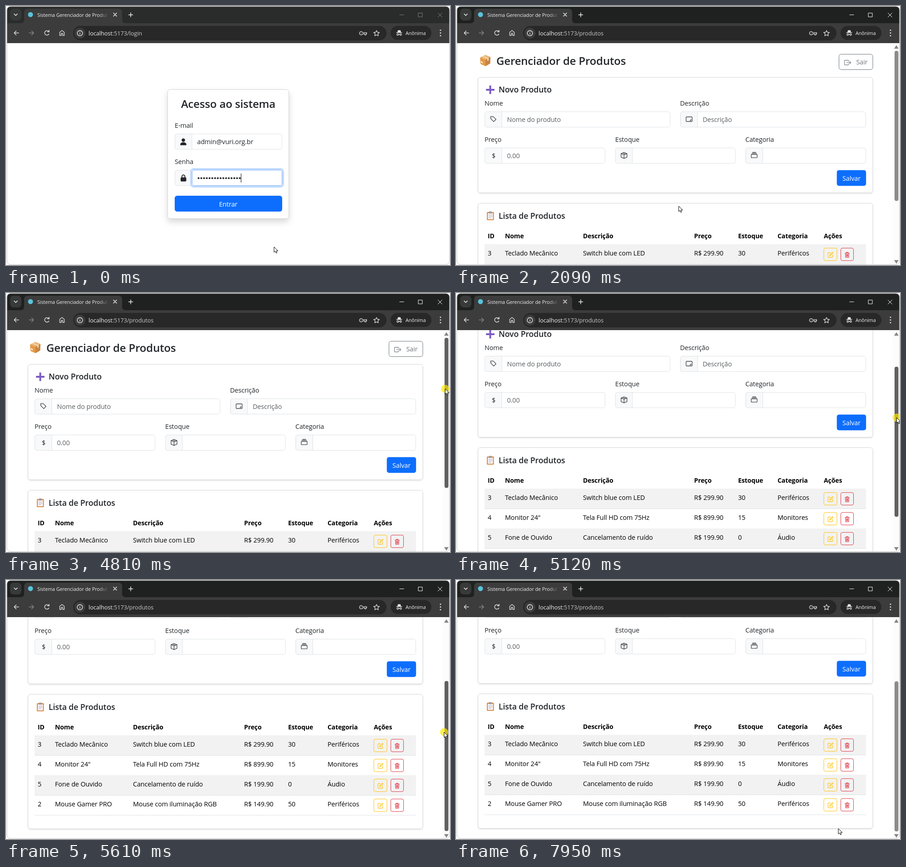
An HTML page that plays this animation: 979x572 px, repeating every 8 s.

```html
<!DOCTYPE html>
<html lang="pt-BR">
<head>
<meta charset="utf-8">
<title>Sistema Gerenciador de Produtos</title>
<style>
html, body { margin: 0; width: 100%; height: 100%; overflow: hidden; background: #fff; }
svg { display: block; }
text { font-family: "Open Sans", "Noto Sans", sans-serif; letter-spacing: -.1px; white-space: pre; }
.icon { fill: none; stroke: currentColor; stroke-linecap: round; stroke-linejoin: round; }
</style>
</head>
<body>
<svg id="stage" width="979" height="572" viewBox="0 0 979 572"></svg>
<script>
const LOOP = 8000, INK = '#212529', LINE = '#dee2e6', BLUE = '#0d6efd', HINT = '#595c5f';
const BODY = 14.35, HEAD = 23.9, SUBHEAD = 17.7;

const ICONS = {
  tag: 'M1.5 2.5a1 1 0 0 1 1-1h4.6l7 7-5.3 5.3-7-7zM4.6 4.6h.2',
  note: 'M2 2.5h12a1.2 1.2 0 0 1 1.2 1.2v8.6a1.2 1.2 0 0 1-1.2 1.2H2a1.2 1.2 0 0 1-1.2-1.2V3.7A1.2 1.2 0 0 1 2 2.5zM12.5 8.3v2.5h-2.5',
  box: 'M8 .8 15 3.6v8.8L8 15.2 1 12.4V3.6zM1 3.6l7 2.8 7-2.8M8 6.4v8.8M4.5 2.2l7 2.8',
  stack: 'M2 6.5h12a1 1 0 0 1 1 1v6a1 1 0 0 1-1 1H2a1 1 0 0 1-1-1v-6a1 1 0 0 1 1-1zM2.5 4.2h11M4 2h8',
  exit: 'M10 5V3.5a1 1 0 0 0-1-1H1.5a1 1 0 0 0-1 1v9a1 1 0 0 0 1 1H9a1 1 0 0 0 1-1V11M5.5 8H15.5M12.5 5l3 3-3 3',
  edit: 'M14 8v5.5a1 1 0 0 1-1 1H2.5a1 1 0 0 1-1-1V3a1 1 0 0 1 1-1H8M6 10.3l.5-2.5 7-7 1.9 1.9-7 7z',
  trash: 'M2 3.5h12M3.2 3.5l.8 11.5h8l.8-11.5M5.5 3.3V1.5h5v1.8M6 6v6.5M8 6v6.5M10 6v6.5'
};

const text = (x, y, s, size = BODY, fill = INK, more = '') =>
  `<text x="${x}" y="${y}" font-size="${size}" fill="${fill}" ${more}>${s}</text>`;
const title = (x, y, s, size, more = '') => text(x, y, s, size, INK, 'font-weight="600" ' + more);
const box = (x, y, w, h, r, fill, more = '') =>
  `<rect x="${x}" y="${y}" width="${w}" height="${h}" rx="${r}" fill="${fill}" ${more}/>`;
const outline = (x, y, w, h, r, color, fill = 'none') =>
  box(x + .5, y + .5, w - 1, h - 1, r, fill, `stroke="${color}"`);
const stroke = (d, color, width = 1.4, more = '') =>
  `<path class="icon" d="${d}" style="color:${color}" stroke-width="${width}" ${more}/>`;
const icon = (name, cx, cy, color = INK, scale = .93) =>
  stroke(ICONS[name], color, 1.1 / scale, `transform="translate(${cx - 8 * scale} ${cy - 8 * scale}) scale(${scale})"`);
const card = (x, y, w, h, filter) =>
  box(x + .5, y + .5, w - 1, h - 1, 5.5, '#fff', `stroke="#d3d5d7" filter="url(#${filter})"`);
const middle = 'text-anchor="middle"';

function field(x, y, w, glyph, value = '', color = HINT) {
  return outline(x, y, w, 35, 5, LINE, '#fff') +
    `<path d="M${x + 38} ${y + .5}h-32.5a5 5 0 0 0-5 5v24a5 5 0 0 0 5 5h32.5z" fill="#f8f9fa" stroke="${LINE}"/>` +
    glyph + text(x + 49.5, y + 23, value, BODY, color);
}

function rowButton(name, x, y, w, color) {
  return outline(x, y, w, 28.6, 3.5, color) + icon(name, x + w / 2, y + 15.3, color, .82);
}

function browser() {
  const light = '#dcdcdc';
  return box(2, 1, 976, 38, 0, '#1f2020', 'id="strip"') + box(2, 38, 976, 44, 0, '#3c3c3c') +
    '<path d="M32 38q8 0 8-8V14q0-8 8-8h200q8 0 8 8v16q0 8 8 8z" fill="#3c3c3c"/>' +
    box(9, 6, 25, 26, 8, '#383939') + stroke('M18 17.5l3.5 3.5 3.5-3.5', '#eee', 1.6) +
    '<circle cx="54" cy="19" r="5.5" fill="#58c4dc"/>' +
    text(69, 23.5, 'Sistema Gerenciador de Produt', 10.8, 'url(#fade)') +
    stroke('M237 15.5l7 7m0-7l-7 7M270.5 19.5h9m-4.5-4.5v9', '#eee', 1.5) +
    '<g id="controls">' + stroke('M868 19.5h9M909.5 15.5h8.5v8.5h-8.5zM952.5 15.5l9 9m0-9l-9 9', 'inherit', 1) + '</g>' +
    stroke('M28 59.5H18m4.5-4.5L18 59.5l4.5 4.5', light, 1.5) +
    stroke('M51 59.5h10m-4.5-4.5l4.5 4.5-4.5 4.5', '#858585', 1.5) +
    stroke('M94.5 62a5 5 0 1 1-.8-6.2l1.3 1.3m0-3.6v3.6h-3.6', light, 1.5) +
    stroke('M118.5 65v-7l5-4 5 4v7h-3.5v-4.5h-3V65z', light, 1.4) +
    box(148, 44, 691, 32, 16, '#282828') + '<circle cx="163" cy="60" r="12" fill="#3c3c3c"/>' +
    stroke('M163 54.2a5.8 5.8 0 1 0 .01 0M163 59.7v3M163 57.2v.1', light, 1.4) +
    `<text x="182" y="65" font-size="12.8" fill="#f0f0f0">localhost<tspan fill="#c8c8c8" id="path"></tspan></text>` +
    stroke('M786.5 58.8a3.7 3.7 0 1 0 0 2.7h4.5v2.3h2.8v-2.3h1.5v-2.7zM782.9 60.1h.2', light, 1.3) +
    stroke('M817 54l1.9 4 4.4.5-3.3 3 .9 4.4-3.9-2.2-3.9 2.2.9-4.4-3.3-3 4.4-.5z', light, 1.3) +
    box(848, 44, 90, 31, 15.5, '#282828') +
    '<path d="M863 58l1.3-4.5h5.4L871 58z" fill="#e8e8e8"/>' +
    stroke('M861 58.7h12M865.5 63a1.8 1.8 0 1 1-3.6 0 1.8 1.8 0 1 1 3.6 0zm6.6 0a1.8 1.8 0 1 1-3.6 0 1.8 1.8 0 1 1 3.6 0zm-6.6-.4h3', '#e8e8e8', 1.2) +
    text(881, 63.5, 'Anônima', 10.8, '#f0f0f0') +
    [53.5, 59.5, 65.5].map(y => `<circle cx="958" cy="${y}" r="1.5" fill="${light}"/>`).join('');
}

function login() {
  const person = `<circle cx="391" cy="296.3" r="3.7" fill="${INK}"/>
    <path d="M384.2 306.500q0-5.500 6.800-5.500t6.800 5.500q0 1-1 1h-11.600q-1 0-1-1z" fill="${INK}"/>`;
  const lock = box(385, 378.5, 12.5, 9, 2, INK) + stroke('M387.9 379v-2.5a3.3 3.3 0 0 1 6.6 0v2.5', INK, 1.8);
  const dots = Array.from({ length: 16 }, (_, i) =>
    `<circle cx="${424.6 + i * 6.06}" cy="380.3" r="2.05" fill="${INK}"/>`).join('');
  return card(356, 184, 268, 286, 'deep') +
    title(490, 225, 'Acesso ao sistema', HEAD, middle) +
    text(372, 269, 'E-mail') + field(372, 282, 237, person, 'admin@vuri.org.br', INK) +
    text(372, 349, 'Senha') + field(372, 362, 237, lock) +
    `<g id="focus">${box(408, 360, 203, 39, 6, '#fff', 'stroke="#c2dbfe" stroke-width="4"')}
      ${outline(410, 362, 199, 35, 4.5, '#86b7fe')}</g>` +
    dots + box(517.8, 370, 1, 20, 0, '#000', 'id="caret"') +
    box(370.2, 417.2, 240.6, 38.6, 7, 'none', 'id="ring" stroke="#b9d0f7" stroke-width="3.7"') +
    box(372, 419, 237, 35, 5.5, BLUE) + box(372, 419, 237, 35, 5.5, '#0b5ed7', 'id="hover"') +
    text(490, 443, 'Entrar', BODY, '#fff', middle);
}

function products() {
  const parcel = `<path d="M53 113.500l12-5.500 11 4.500-11 6z" fill="#e8b475"/>
    <path d="M53 113.500l12 5v14.500l-11-5z" fill="#e59a45"/>
    <path d="M65 118.500l11-6-.5 14.500L65 133z" fill="#c98543"/>
    <path d="M57.500 111.500l3-1.400 11.500 4.800v5l-3 1.500v-4.900z" fill="#f3d6a5"/>
    <path d="M55 121.500l4 1.700v3.800l-4-1.700z" fill="#f4e5ce"/>`;
  const clipboard = box(68, 455, 15.5, 18, 1.5, '#d98b48') + box(70, 457.5, 11.5, 13.5, 0, '#f7f3f5') +
    box(72.5, 453.8, 6.5, 4.5, 1, '#9b9ba3') +
    stroke('M72 461.5h7.5m-7.5 3h7.5m-7.5 3h5', '#a9aac0', .9);
  const columns = [70, 108, 280, 525, 622, 709, 811];
  const heads = ['ID', 'Nome', 'Descrição', 'Preço', 'Estoque', 'Categoria', 'Ações'];
  const rows = [
    ['3', 'Teclado Mecânico', 'Switch blue com LED', 'R$ 299.90', '30', 'Periféricos'],
    ['4', 'Monitor 24"', 'Tela Full HD com 75Hz', 'R$ 899.90', '15', 'Monitores'],
    ['5', 'Fone de Ouvido', 'Cancelamento de ruído', 'R$ 199.90', '0', 'Áudio'],
    ['2', 'Mouse Gamer PRO', 'Mouse com iluminação RGB', 'R$ 149.90', '50', 'Periféricos']
  ];
  const table = rows.map((cells, i) => {
    const y = 526 + 44 * i;
    return (i % 2 ? '' : box(63, y, 841, 44, 0, '#f2f2f2')) + box(63, y + 44, 841, 1, 0, LINE) +
      cells.map((s, c) => text(columns[c], y + 25, s, BODY, '#000')).join('') +
      rowButton('edit', 810.5, y + 8.2, 30, '#ffc107') +
      rowButton('trash', 848, y + 8.2, 29, '#dc3545');
  }).join('');
  return parcel + title(89, 129.5, 'Gerenciador de Produtos', HEAD) +
    outline(844, 106, 75.5, 35, 5, '#6c757d') + icon('exit', 863.5, 125, '#6c757d') +
    text(882.5, 129, 'Sair', BODY, '#6c757d') +
    card(48, 157, 871.5, 256, 'soft') +
    box(66, 183, 19, 4, 1, '#7a5bc4') + box(73.5, 175.5, 4, 19, 1, '#7a5bc4') +
    title(94, 191, 'Novo Produto', SUBHEAD) +
    text(63, 220, 'Nome') + field(63, 233, 409.5, icon('tag', 82.5, 250), 'Nome do produto') +
    text(494, 220, 'Descrição') + field(494.5, 233, 409.5, icon('note', 514, 250), 'Descrição') +
    text(63, 300, 'Preço') + field(63, 313, 266, text(83, 335.5, '$', BODY, INK, middle), '0.00') +
    text(351, 300, 'Estoque') + field(351, 313, 265.5, icon('box', 370.5, 330)) +
    text(638, 300, 'Categoria') + field(638.5, 313, 265.5, icon('stack', 657.5, 329)) +
    box(839.7, 362.4, 64.5, 34.8, 5, BLUE) + text(872, 386, 'Salvar', BODY, '#fff', middle) +
    card(48, 435, 871.5, 298, 'soft') + clipboard + title(94, 469.5, 'Lista de Produtos', SUBHEAD) +
    heads.map((s, c) => text(columns[c], 513, s, 14, '#000', 'font-weight="700"')).join('') +
    box(63, 526, 841, 1, 0, LINE) + table;
}

const stage = document.getElementById('stage');
stage.innerHTML = `<defs>
  <clipPath id="window"><rect x="2" y="1" width="976" height="570" rx="8"/></clipPath>
  <clipPath id="view"><rect x="2" y="82" width="976" height="489"/></clipPath>
  <linearGradient id="fade" gradientUnits="userSpaceOnUse" x1="204" x2="226" y1="0" y2="0">
    <stop stop-color="#eee"/><stop offset="1" stop-color="#eee" stop-opacity="0"/></linearGradient>
  <filter id="deep" x="-20%" y="-20%" width="140%" height="140%"><feDropShadow dx="0" dy="7" stdDeviation="7" flood-opacity=".15"/></filter>
  <filter id="soft" x="-5%" y="-5%" width="110%" height="110%"><feDropShadow dx="0" dy="2" stdDeviation="1.8" flood-opacity=".09"/></filter>
  </defs>
  <g clip-path="url(#window)">
    ${browser()}
    <g clip-path="url(#view)">
      <g id="login">${login()}</g>
      <g id="products"><g id="scroll">${products()}</g>
        ${box(963, 82, 15, 489, 0, '#fcfcfc')}
        <path d="M966 94.300l5-7.800 5 7.800zM966 561.200l5 7.800 5-7.800z" fill="#858585"/>
        ${box(967, 99, 8.5, 331.5, 4, '#8b8b8b', 'id="thumb"')}</g>
    </g>
  </g>
  ${box(2, 1, 976, 570, 8, 'none', 'stroke="#c4c4c4"')}
  <g id="cursor">
    <circle id="press" r="9" fill="#ffe900" opacity=".68"/>
    <path id="arrow" d="M0 0V12L2.800 9.500 4.700 13.800 6.700 12.900 4.900 8.800H8.800Z" fill="#fff" stroke="#000"/>
    <path id="hand" d="M-3.500 8V1a1.300 1.300 0 0 1 2.600 0V5q2.200-.8 2.400.6 2-.5 2.200.7 1.800-.3 1.800 1.300V11q0 1.800-1.300 3.200V15.500h-5.600v-1.200L-6.600 9.500q-.5-1.500 1-1.600z" fill="#fff" stroke="#000"/>
  </g>`;

const el = {};
stage.querySelectorAll('[id]').forEach(node => el[node.id] = node);

// Pointer path: time, x, y
const POINTER = [
  [60, 591, 532], [250, 572, 515], [520, 506, 460], [760, 491, 447], [900, 491, 447], [1140, 491, 442],
  [2970, 491, 442], [3090, 540, 425], [3400, 810, 331], [3590, 895, 299], [3710, 938, 275],
  [3780, 938, 275], [4000, 953, 245], [4410, 968.3, 211.5], [4810, 968.3, 211.5], [4900, 969, 224],
  [5120, 971.5, 275], [5400, 968, 328], [5490, 966, 336], [5610, 966, 336], [6050, 965, 347],
  [7180, 965, 347], [7330, 950, 375], [7700, 860, 526], [7950, 843, 549]
];
const clamp = (v, lo, hi) => Math.min(hi, Math.max(lo, v));
const show = (node, on) => node.setAttribute('visibility', on ? 'visible' : 'hidden');

function pointerAt(t) {
  const i = POINTER.findIndex(key => key[0] > t);
  if (i === 0) return POINTER[0].slice(1);
  if (i < 0) return POINTER[POINTER.length - 1].slice(1);
  const [a, b] = [POINTER[i - 1], POINTER[i]], k = (t - a[0]) / (b[0] - a[0]);
  return [1, 2].map(n => a[n] + (b[n] - a[n]) * k);
}

function draw(t) {
  const [x, y] = pointerAt(t);
  const loggedIn = t >= 1900, active = t >= 1700;
  const clicking = t >= 1700 && t < 1850, dragging = t >= 4740 && t < 6670;
  const overButton = !loggedIn && y < 454;
  const scroll = t < 4740 ? 0 : t > 6050 ? 184 : Math.round(clamp((y - 211.5) * 1.47, 0, 184));

  el.login.style.display = loggedIn ? 'none' : '';
  el.products.style.display = loggedIn ? '' : 'none';
  el.path.textContent = loggedIn ? ':5173/produtos' : ':5173/login';
  el.strip.setAttribute('fill', active ? '#1f2020' : '#2a2b2b');
  el.controls.style.color = active ? '#fff' : '#828282';

  el.focus.setAttribute('opacity', clamp(1 - (t - 60) / 150, 0, 1));
  el.caret.setAttribute('opacity', t < 60 ? 1 : 0);
  el.hover.setAttribute('opacity', clamp((t - 600) / 150, 0, 1));
  el.ring.setAttribute('opacity', clamp((t - 1700) / 150, 0, 1));

  el.scroll.setAttribute('transform', `translate(0 ${-scroll})`);
  el.thumb.setAttribute('y', 99 + scroll / 1.475);
  el.thumb.setAttribute('fill', x > 962 || dragging ? '#606060' : '#8b8b8b');

  el.cursor.setAttribute('transform', `translate(${x} ${y})`);
  show(el.press, clicking || dragging);
  show(el.arrow, !overButton);
  show(el.hand, overButton);
}

function frame() {
  draw(performance.now() % LOOP);
  requestAnimationFrame(frame);
}
frame();
</script>
</body>
</html>
```
